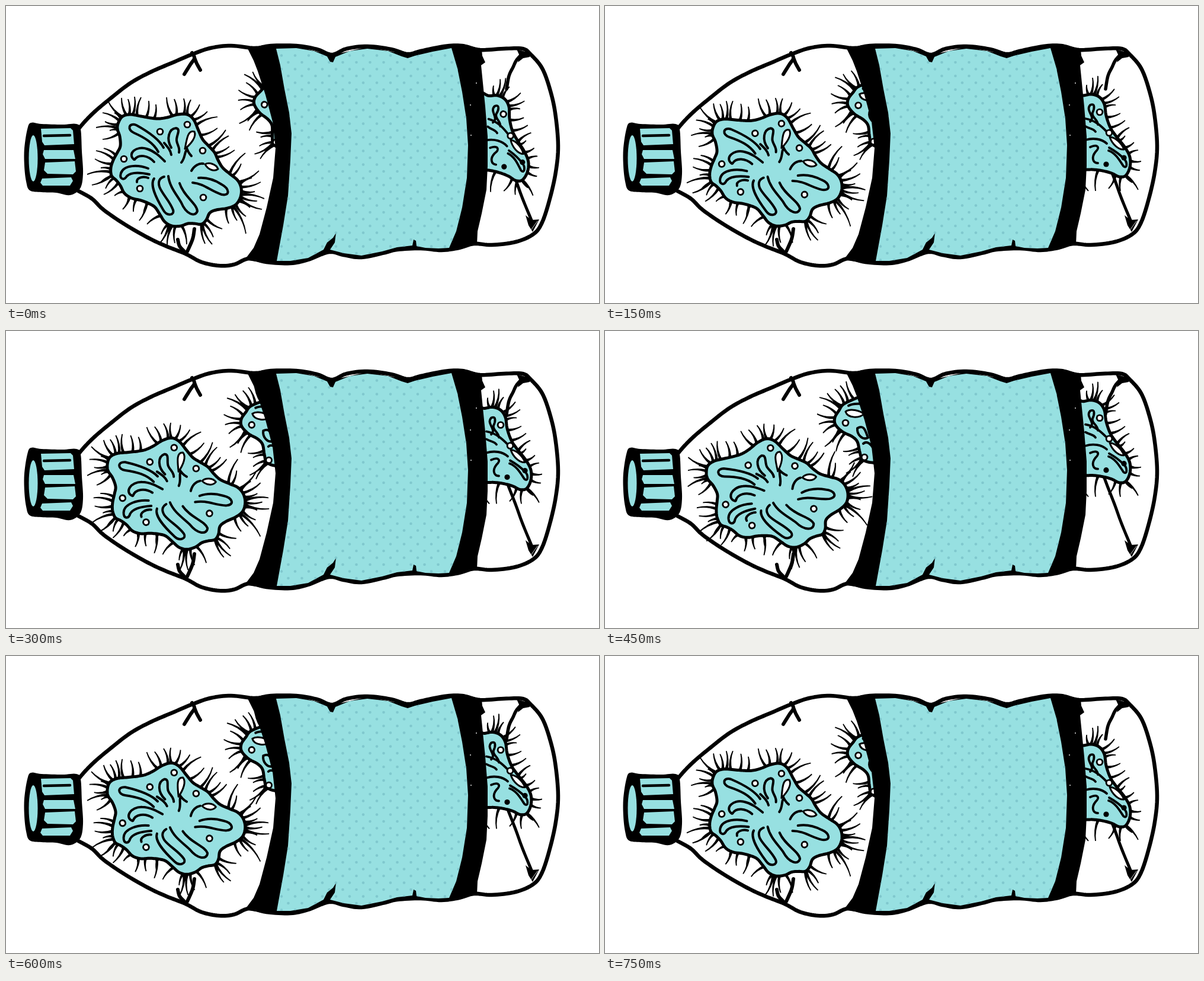
Write an HTML page with a canvas that moves like this. It is 1001 px wide and 501 px high and loops after 900 ms.

```html
<!DOCTYPE html>
<html lang="en">
<head>
<meta charset="utf-8">
<title>Bottle with microbes</title>
<style>
html, body { margin: 0; width: 100%; height: 100%; overflow: hidden; background: #fff; }
canvas { display: block; }
</style>
</head>
<body>
<canvas id="stage" width="1001" height="501"></canvas>
<script>
const ctx = document.getElementById('stage').getContext('2d');
const TEAL = '#97e0e1', DOT = '#80c8ce', INK = '#000', WHITE = '#fff';
const STEP = 150, ORDER = [0, 1, 2, 3, 2, 1];

const points = text => text.trim().split(/\s+/).map(p => p.split(',').map(Number));

// Catmull-Rom samples through the given points
function smooth(text, closed) {
  const p = points(text), n = p.length, out = [];
  const at = i => closed ? p[(i + n) % n] : p[Math.max(0, Math.min(n - 1, i))];
  for (let i = 0; i < (closed ? n : n - 1); i++) {
    const [a, b, c, d] = [at(i - 1), at(i), at(i + 1), at(i + 2)];
    for (let k = 0; k < 8; k++) {
      const t = k / 8;
      out.push([0, 1].map(j => b[j] + 0.5 * t * (c[j] - a[j] +
        t * (2 * a[j] - 5 * b[j] + 4 * c[j] - d[j] + t * (3 * (b[j] - c[j]) + d[j] - a[j])))));
    }
  }
  if (!closed) out.push(p[n - 1]);
  return out;
}

function toPath(list, closed) {
  const path = new Path2D();
  list.forEach(([x, y]) => path.lineTo(x, y));
  if (closed) path.closePath();
  return path;
}
const curve = (text, closed) => toPath(smooth(text, closed), closed);
const polygon = text => toPath(points(text), true);

// Tapered hairs growing from the nearest place on the body edge
function growHairs(edge, tips) {
  const path = new Path2D();
  points(tips).forEach(([x, y], i) => {
    const dist = q => Math.hypot(q[0] - x, q[1] - y);
    const root = edge.reduce((a, b) => dist(b) < dist(a) ? b : a);
    const len = dist(root) || 1;
    const nx = (root[1] - y) / len, ny = (x - root[0]) / len;
    const bend = len * 0.14 * (i % 3 ? 1 : -1);
    const mx = (x + root[0]) / 2 + nx * bend, my = (y + root[1]) / 2 + ny * bend;
    const side = (s, w) => [mx + nx * s * w, my + ny * s * w];
    path.moveTo(root[0] + nx * 2.6, root[1] + ny * 2.6);
    path.quadraticCurveTo(...side(1, 1.3), x + nx * 0.9, y + ny * 0.9);
    path.lineTo(x - nx * 0.9, y - ny * 0.9);
    path.quadraticCurveTo(...side(-1, 1.3), root[0] - nx * 2.6, root[1] - ny * 2.6);
    path.closePath();
  });
  return path;
}

function microbe({ edge, tips, marks, lenses, rings, spots = '', pivot, poses, weight }) {
  const rim = smooth(edge, true);
  return {
    body: toPath(rim, true), hairs: growHairs(rim, tips), marks: new Path2D(marks),
    lenses: new Path2D(lenses), rings: points(rings), spots: spots ? points(spots) : [],
    pivot, poses, weight
  };
}

const big = microbe({
  pivot: [276, 257.5], weight: 4,
  poses: [[276, 257.5, 0], [273.7, 258.5, -5.6], [270.7, 260.3, -15.9], [274.3, 262, -23.1]],
  edge: `190,196 197,186 210,183 228,186 245,189 258,190 272,188 290,183 306,183 317,192 325,210
    332,225 342,236 352,247 358,260 366,273 379,284 391,294 397,307 396,322 388,335 374,341 355,344
    344,349 338,361 330,368 318,367 307,367 295,371 280,371 268,364 260,352 252,340 243,334 228,328
    212,324 200,316 193,303 186,294 178,286 177,273 181,260 188,247 193,236 192,220 188,207`,
  tips: `195,155 206,157 217,153 228,154 241,160 253,166 271,154 284,157 300,156 312,158 327,166
    340,178 357,187 357,206 371,209 376,219 377,237 386,243 404,248 397,266 427,278 415,290 430,297
    420,313 436,325 424,329 432,343 412,340 405,355 390,362 405,384 376,367 365,376 350,390 348,402
    336,401 305,402 285,400 272,405 258,402 262,385 238,368 225,362 232,350 215,347 197,343 205,331
    183,320 165,318 168,308 160,297 145,302 137,284 160,273 150,258 152,244 165,240 163,225 152,205
    175,210 167,195 163,180 183,180 172,160`,
  marks: `M266 239C258 224 240 212 220 201C207 196 204 209 216 214C234 222 249 231 257 246
    M216 259C204 249 220 235 238 241C251 245 260 254 268 262M217 259C224 249 240 252 250 263
    M240 274C224 268 199 267 194 282C191 292 199 295 204 287C212 279 228 281 242 284
    M221 297C220 289 232 287 240 290
    M250 291C242 302 254 325 266 345C272 355 285 353 282 344C276 328 264 318 259 305C256 295 260 290 267 288
    M274 287C276 305 288 318 296 332C304 351 319 357 323 346C322 333 300 321 293 299
    M315 298C335 300 345 312 364 318C379 321 377 308 364 301C350 292 338 289 325 290
    M313 278C318 269 326 265 333 266
    M279 239C270 224 275 207 287 206C296 208 287 219 288 227C289 235 294 239 292 247
    M304 244C301 250 302 257 296 264M304 236C306 244 309 249 313 253
    M267 231C274 239 278 244 279 251`,
  lenses: `M318 212C307 208 305 225 302 241C313 232 322 220 318 212Z
    M336 267C343 263 355 267 358 275C351 280 341 276 336 267Z`,
  rings: '260,212 306,200 332,244 333,323 226,308 199,258'
});

const small = microbe({
  pivot: [418, 150], weight: 4,
  poses: [[449, 164, 12], [440, 164, 6], [427, 154, 3], [418, 150, 0]],
  edge: `480,100 440,108 420,115 402,124 395,134 388,146 389,158 401,170 417,178 426,187 430,204
    435,217 452,222 480,220`,
  tips: `407,85 397,92 388,98 375,105 362,112 368,125 358,140 361,157 368,172 371,195 384,188
    390,203 402,203 411,210 412,225 407,240 418,246`,
  marks: `M426 164C438 157 440 170 444 180C434 185 425 174 426 164Z
    M436 190C442 184 450 192 453 198M411 126C420 121 428 124 436 122`,
  lenses: 'M406 136C414 130 430 134 437 140C430 147 410 148 406 136Z',
  rings: '406,155 438,213'
});

const side = microbe({
  pivot: [852, 229], weight: 3.8,
  poses: [[851, 234, 6.4], [852, 229, 0], [852, 208.5, 0], [852, 196.7, 0]],
  edge: `780,156 808,151 822,149 835,154 843,166 846,185 853,205 863,220 878,239 886,255 886,272
    879,286 868,288 855,282 840,278 825,276 812,276 780,276`,
  tips: `813,133 823,121 832,118 840,132 860,140 868,153 862,167 870,181 878,193 885,205 878,219
    893,230 900,243 905,262 903,277 900,310 890,298 870,312 850,308 828,312 816,312`,
  marks: `M819 195C829 186 810 177 819 167C828 163 826 174 823 180C821 188 832 191 832 200
    M811 190C829 193 840 205 848 213M811 203C819 208 824 206 828 212
    M819 238C832 232 836 239 828 246C820 256 824 265 832 265
    M811 226C824 222 838 224 847 232
    M850 244C862 248 869 261 875 270C882 276 882 263 876 258C868 249 860 244 851 239`,
  lenses: 'M852 221C862 221 873 233 876 242C867 243 856 233 852 221Z',
  rings: '835,179 851,214', spots: '846,267 876,256'
});

const shell = curve(`122,208 133,195 150,178 175,157 210,130 245,111 280,96 313,82 345,71 380,67 420,71
  447,67 490,67 525,73 550,82 575,72 610,68 650,73 678,81 700,76 740,68 770,67 800,74 840,72 872,72
  886,82 905,105 918,140 927,180 932,235 928,280 918,325 905,365 890,385 860,398 820,403 790,401
  765,408 735,412 700,409 660,411 640,416 600,424 570,420 545,415 510,428 480,434 440,432 410,426
  385,436 360,438 330,432 303,418 270,405 240,391 200,368 165,344 145,325 122,312`);

const sleeve = polygon(`408,72 418,92 425,110 438,150 450,195 455,240 451,290 440,340 428,385 418,408
  403,428 440,434 480,434 545,415 600,424 660,411 735,412 795,402 796,380 803,350 811,310 813,270
  813,220 809,170 805,130 802,100 809,95 804,84 803,73 765,65 740,68 678,82 610,69 550,83 490,68 447,66`);

const label = polygon(`456,72 490,71 520,76 542,85 547,94 552,95 556,86 580,76 610,72 645,76 668,85
  678,88 690,84 720,77 752,71 762,105 770,145 777,190 780,235 778,290 770,340 760,380 748,408 730,409
  708,408 693,405 692,396 688,394 686,404 660,407 635,414 600,421 570,417 547,411 555,399 557,383
  552,391 542,399 536,411 510,425 480,430 457,430 468,370 476,320 480,260 482,215 478,180 470,140 463,100`);

const cap = curve(`42,197 60,199 95,200 119,199 126,208 128,245 130,283 125,308 108,319 85,315 60,314
  40,311 34,296 31,270 31,240 36,208`, true);
const capPanels = [
  '59,207 109,206 113,210 115,233 65,235 61,229', '64,243 114,243 117,258 66,258 62,250',
  '66,264 116,262 118,279 113,284 70,283 64,277', '61,291 110,289 113,295 108,303 62,303 58,298'
].map(polygon);

const topFold = curve('872,80 862,91 856,103 849,118 845,140');
const lowFold = curve('840,240 849,264 860,292 872,325 889,366');
const dents = [
  curve('314,79 318,88 311,99 301,115'), curve('318,87 322,97 328,108'),
  curve('318,376 315,393 306,414'), curve('290,394 293,405 301,414')
];

function fill(path, color) { ctx.fillStyle = color; ctx.fill(path); }
function stroke(path, width, color = INK) {
  ctx.lineWidth = width;
  ctx.strokeStyle = color;
  ctx.stroke(path);
}
function disc(x, y, r, color) {
  ctx.fillStyle = color;
  ctx.beginPath();
  ctx.arc(x, y, r, 0, 2 * Math.PI);
  ctx.fill();
}

function drawMicrobe(m, pose) {
  const [x, y, angle] = m.poses[pose];
  ctx.save();
  ctx.translate(x, y);
  ctx.rotate(angle * Math.PI / 180);
  ctx.translate(-m.pivot[0], -m.pivot[1]);
  fill(m.hairs, INK);
  fill(m.body, TEAL);
  stroke(m.body, 5);
  stroke(m.marks, m.weight);
  fill(m.lenses, WHITE);
  stroke(m.lenses, 3);
  m.rings.forEach(([cx, cy]) => { disc(cx, cy, 6.3, INK); disc(cx, cy, 3.4, WHITE); });
  m.spots.forEach(([cx, cy]) => disc(cx, cy, 4.6, INK));
  ctx.restore();
}

function drawLabel() {
  fill(label, TEAL);
  ctx.save();
  ctx.clip(label);
  for (let row = 0; row < 32; row++)
    for (let col = 0; col < 15; col++)
      disc(465 + 23 * col + (row % 2) * 11.5, 83.5 + 11.5 * row, 2.3, DOT);
  ctx.restore();
}

function drawCap() {
  fill(cap, INK);
  ctx.fillStyle = TEAL;
  ctx.beginPath();
  ctx.ellipse(46, 257, 7.5, 39, 0, 0, 2 * Math.PI);
  ctx.fill();
  capPanels.forEach(p => fill(p, TEAL));
  stroke(new Path2D('M64 219L108 218'), 4.5);
}

function draw(pose) {
  fill(new Path2D('M0 0H1001V501H0Z'), WHITE);
  ctx.lineCap = ctx.lineJoin = 'round';
  stroke(topFold, 5.5);
  stroke(lowFold, 5);
  fill(polygon('877,353 887,361 900,360 889,381 882,370'), INK);
  fill(polygon('862,73 884,79 884,86 873,88 864,95 867,84'), INK);
  drawMicrobe(small, pose);
  drawMicrobe(big, pose);
  drawMicrobe(side, pose);
  dents.forEach(d => stroke(d, 6));
  fill(sleeve, INK);
  stroke(shell, 6.5);
  drawLabel();
  stroke(new Path2D('M886 378L897 363'), 0.8, WHITE);
  [[784, 167], [785, 218], [794, 130]].forEach(([x, y]) => disc(x, y, 0.9, WHITE));
  drawCap();
}

function tick() {
  draw(ORDER[Math.floor(performance.now() / STEP) % ORDER.length]);
  requestAnimationFrame(tick);
}
tick();
</script>
</body>
</html>
```
